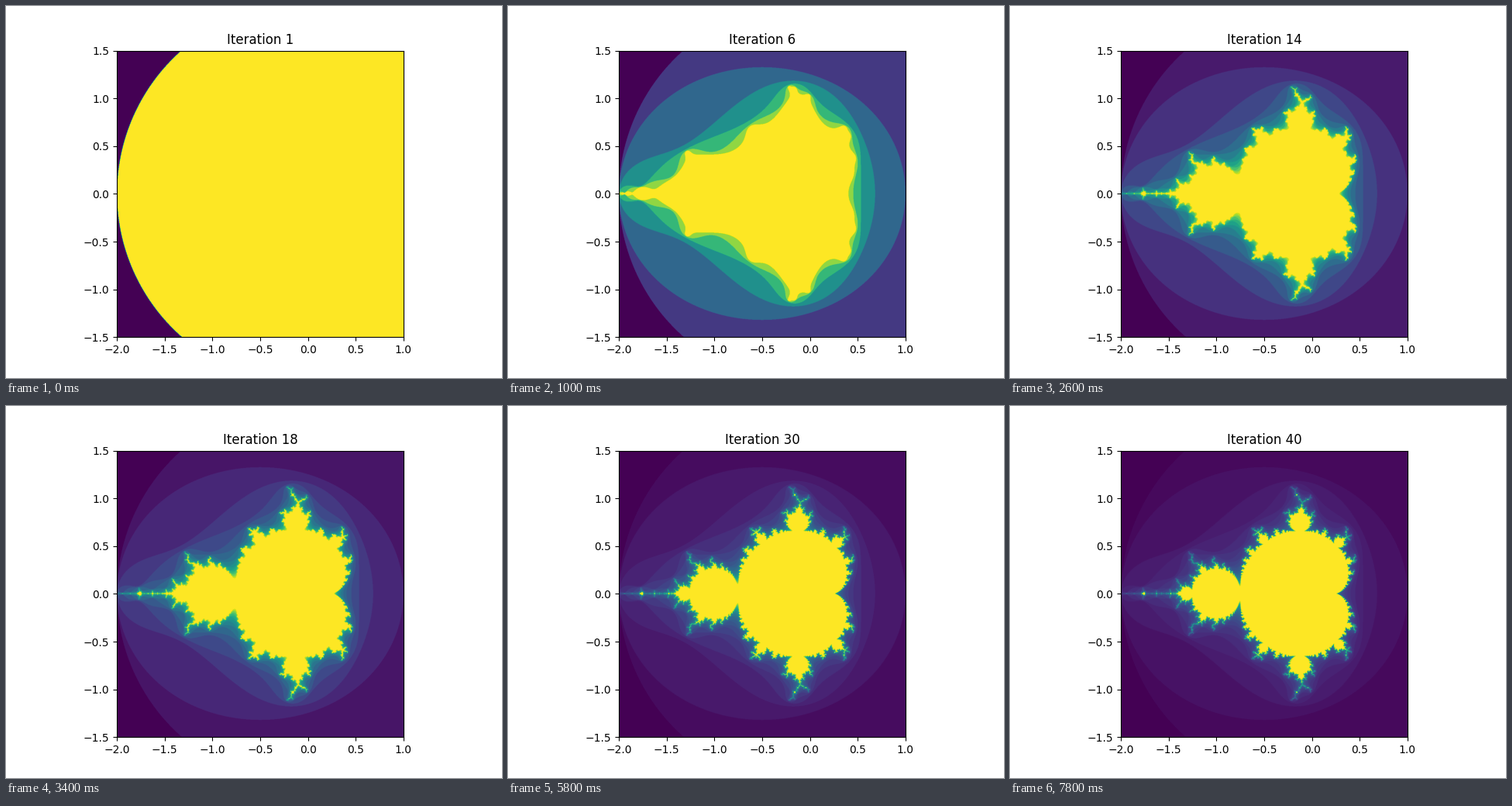
Animation, 640 px wide and 480 px high, one loop 8000 ms. Source, as a matplotlib script:

```python
import numpy as np
import matplotlib.pyplot as plt
from matplotlib.animation import FuncAnimation

STEPS = 40
SIZE = 1000
EXTENT = (-2.0, 1.0, -1.5, 1.5)


def escape_steps(size, steps):
    """Count how many steps of z -> z*z + c each point stays within |z| <= 2."""
    x = np.linspace(EXTENT[0], EXTENT[1], size)
    y = np.linspace(EXTENT[2], EXTENT[3], size)
    c = (x[None, :] + 1j * y[:, None]).ravel()
    z = np.zeros_like(c)
    count = np.zeros(c.size, dtype=int)
    live = np.arange(c.size)
    for _ in range(steps):
        z = z * z + c
        inside = z.real ** 2 + z.imag ** 2 <= 4
        z, c, live = z[inside], c[inside], live[inside]
        count[live] += 1
    return count.reshape(size, size)


counts = escape_steps(SIZE, STEPS)

fig, ax = plt.subplots(figsize=(6.4, 4.8), dpi=100)
image = ax.imshow(np.minimum(counts, 1), extent=EXTENT, origin="lower",
                  cmap="viridis", vmin=0, vmax=1)
title = ax.set_title("Iteration 1")


def update(frame):
    n = frame + 1
    image.set_data(np.minimum(counts, n))
    image.set_clim(0, n)
    title.set_text(f"Iteration {n}")
    return image, title


anim = FuncAnimation(fig, update, frames=STEPS, interval=200,
                     repeat=True, repeat_delay=0, blit=False)
plt.show()
```
